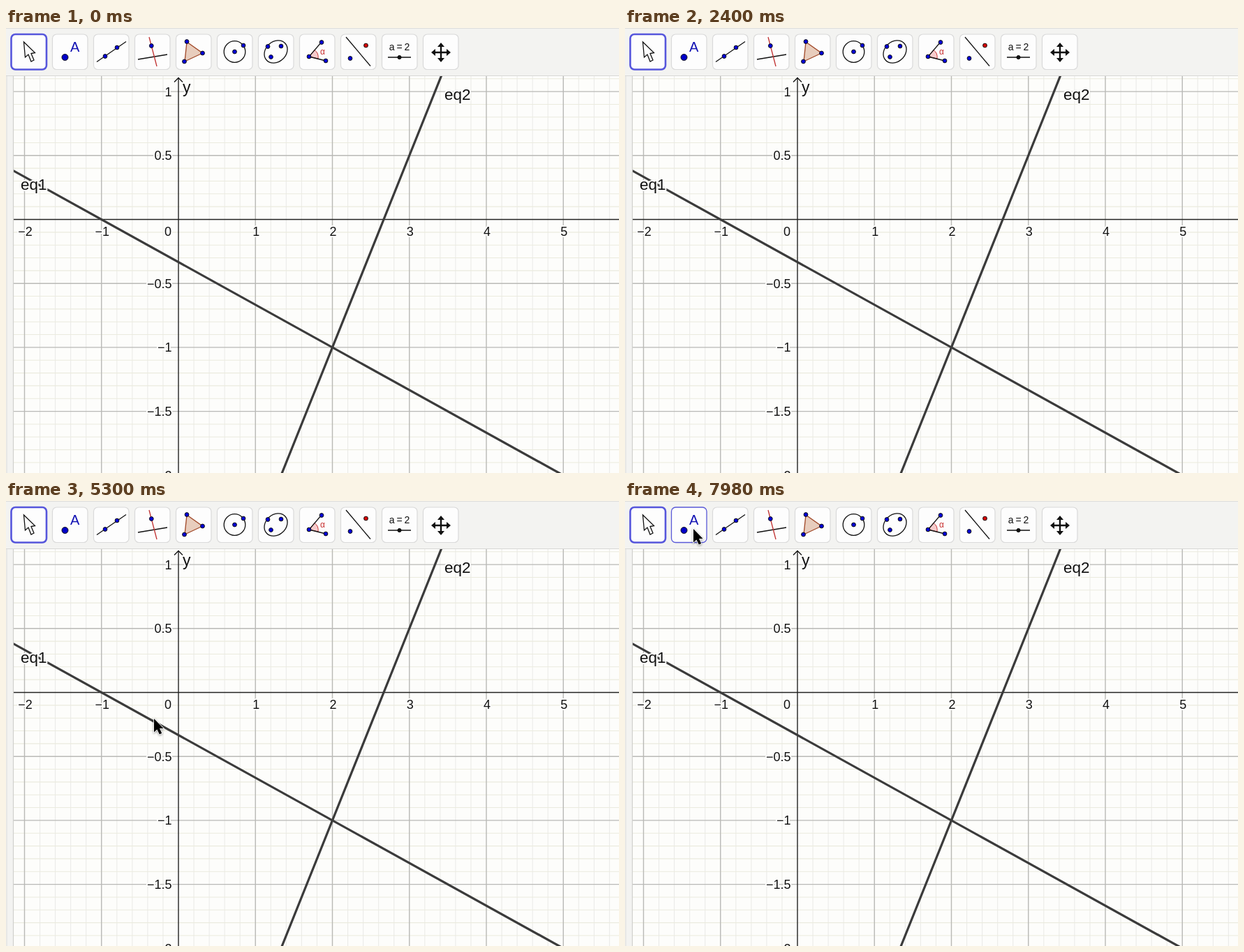
These frames come from a looping animation (878 px wide and 638 px high, 8 s). An HTML page:

```html
<!DOCTYPE html>
<html lang="en">
<head>
<meta charset="utf-8">
<title>Two lines</title>
<style>
  html, body { margin: 0; width: 100%; height: 100%; overflow: hidden; background: #f3f3f1; }
  svg { display: block; width: 878px; height: 638px; }
  text { font-family: "Liberation Sans", Arial, sans-serif; }
  .button { fill: #fdfdfd; stroke: #dadada; stroke-width: 1.2; }
  .button.hover { stroke: #5a5ad8; stroke-width: 1.3; }
  .button.selected { stroke: #5656dc; stroke-width: 2.6; }
  .icon { fill: none; stroke: #111; stroke-width: 1.3; }
  .halo { paint-order: stroke; stroke: #fdfdfb; stroke-width: 4; stroke-linejoin: round; fill: #111; }
</style>
</head>
<body>
<svg id="stage" viewBox="0 0 878 638"></svg>
<script>
const LOOP = 8000;
const ORIGIN = { x: 247, y: 274.5 };
const UNIT = { x: 110.25, y: 183.4 };
const px = x => ORIGIN.x + x * UNIT.x;
const py = y => ORIGIN.y - y * UNIT.y;

const line = (x1, y1, x2, y2, color, width) =>
  `<path d="M${x1} ${y1}L${x2} ${y2}" stroke="${color}" stroke-width="${width}" fill="none"/>`;
const label = (text, x, y, size = 18, anchor = 'start') =>
  `<text class="halo" x="${x}" y="${y}" font-size="${size}" text-anchor="${anchor}">${text}</text>`;
const dot = (x, y, color = '#0000d8', r = 2.9) =>
  `<circle cx="${x}" cy="${y}" r="${r}" fill="${color}" stroke="#111" stroke-width="1"/>`;
const stroke = (d, extra = '') => `<path class="icon" d="${d}" ${extra}/>`;
const signed = n => String(n).replace('-', '−');

function grid() {
  let minor = '', major = '';
  for (let i = -10; i <= 28; i++) {
    const x = px(i / 5);
    if (i % 5) minor += line(x, 69, x, 638, '#ebebe8', 1.1);
    else if (i) major += line(x, 69, x, 638, '#b9b9b6', 1.4);
  }
  for (let i = -19; i <= 11; i++) {
    const y = py(i / 10);
    if (i % 5) minor += line(10, y, 878, y, '#ebebde', 1.1);
    else if (i) major += line(10, y, 878, y, '#b9b9b6', 1.4);
  }
  return minor + major;
}

function axes() {
  let out = line(10, ORIGIN.y, 878, ORIGIN.y, '#222', 1.4)
    + line(ORIGIN.x, 71, ORIGIN.x, 638, '#222', 1.4)
    + stroke('M241 77.5L247 71.5L253 77.5');
  for (let x = -2; x <= 5; x++)
    if (x) out += label(signed(x), px(x) + 1, 297.5, 18, 'middle');
  out += label('0', 232, 297.5, 18, 'middle');
  for (let y = -2; y <= 1; y += 0.5)
    if (y) out += label(signed(y), 237.5, py(y) + 6.5, 18, 'end');
  return out + label('y', 253, 93, 23);
}

function graphs() {
  const curve = (f, x1, x2) => line(px(x1), py(f(x1)), px(x2), py(f(x2)), '#3b3b3b', 3.2);
  return curve(x => -(x + 1) / 3, -2.2, 5.2)
    + curve(x => 1.5 * x - 4, 1.2, 3.6)
    + label('eq1', 21, 232, 22.5)
    + label('eq2', 628, 103, 22.5);
}

const arrowHead = angle =>
  `<path d="M0 -14L5 -8H1.2V0H-1.2V-8H-5Z" fill="#111" transform="translate(623 35) rotate(${angle})"/>`;

const icons = [
  stroke('M25.5 20L27.5 42L32 38L36 48L40 46L36 36.5L41.5 35.5Z'),
  dot(84.5, 42, '#0000c8', 4.5)
    + '<text x="92" y="34" font-size="20" fill="#1414b4">A</text>',
  stroke('M130 48.5L172 19.5') + dot(142, 40.5) + dot(159, 28),
  stroke('M189 45L231 38') + stroke('M205 13L216 55', 'style="stroke:#c03030"') + dot(208.3, 25.5),
  stroke('M259 20L281.5 36L256 48Z', 'style="fill:#e8cdbd;stroke:#a04828"')
    + dot(259, 19.5) + dot(281.5, 36) + dot(255.5, 48),
  '<circle class="icon" cx="327.5" cy="34" r="15.3"/>' + dot(327.5, 34) + dot(340, 25),
  '<ellipse class="icon" cx="386.5" cy="34" rx="18" ry="14.5" transform="rotate(-42 386.5 34)"/>'
    + dot(375, 26.5) + dot(394, 26) + dot(379.5, 41.5),
  stroke('M434 41L442 31.5A13 13 0 0 1 447 44Z', 'style="fill:#f6cccc;stroke:#cc3a3a;stroke-width:1"')
    + stroke('M452 20L434 41L458 47') + dot(452, 20.5) + dot(434, 41) + dot(458, 47)
    + '<text x="450" y="38" font-size="12" fill="#c83030">α</text>',
  stroke('M487 13L522 54.5') + dot(493, 43.5) + dot(515.5, 25, '#d80000'),
  '<text x="563.5" y="32" font-size="14" text-anchor="middle" word-spacing="-1" fill="#111">a = 2</text>'
    + stroke('M547 42H580') + dot(563.5, 42, '#111', 2.6),
  [0, 90, 180, 270].map(arrowHead).join('')
];

const toolbar = icons.map((icon, i) =>
  `<rect class="button${i ? '' : ' selected'}" x="${7.5 + 59 * i}" y="9" width="50.5" height="50.5" rx="6"/>${icon}`
).join('');

document.getElementById('stage').innerHTML = `
  <defs><clipPath id="plot"><rect x="10" y="69" width="868" height="569"/></clipPath></defs>
  <rect width="878" height="638" fill="#f3f3f1"/>
  ${line(0, 0.5, 878, 0.5, '#dededc', 1)}
  <rect x="10" y="69" width="868" height="569" fill="#fdfdfb"/>
  <g clip-path="url(#plot)">${grid()}${axes()}${graphs()}</g>
  ${line(0, 68.5, 878, 68.5, '#d8d8d6', 1.2)}
  ${line(1, 69, 1, 638, '#dcdcda', 1)}
  ${line(10.5, 69, 10.5, 638, '#d0d0ce', 1.2)}
  ${toolbar}
  <path id="cursor" d="M0 0V19.5L4.4 15.4L7.8 22.6L11.2 21L8 14H13.6Z" fill="#000" stroke="#fff"
    stroke-width="1.6" style="paint-order:stroke;filter:drop-shadow(0 1.5px 1.5px #0006)"/>`;

const cursor = document.getElementById('cursor');
const pointButton = document.querySelectorAll('.button')[1];

// Pointer tip positions over time; hidden before the first one
const path = [
  { t: 4700, x: 330, y: 640 },
  { t: 5300, x: 212, y: 312 },
  { t: 6460, x: 125, y: 138 },
  { t: 7980, x: 98, y: 40 }
];
const smooth = u => u * u * (3 - 2 * u);

function pointerAt(t) {
  if (t < path[0].t) return null;
  const next = path.findIndex(p => p.t > t);
  if (next < 0) return path[path.length - 1];
  const a = path[next - 1], b = path[next];
  const u = smooth((t - a.t) / (b.t - a.t));
  return { x: a.x + (b.x - a.x) * u, y: a.y + (b.y - a.y) * u };
}

const start = performance.now();
function draw() {
  const tip = pointerAt((performance.now() - start) % LOOP);
  cursor.style.display = tip ? '' : 'none';
  if (tip) cursor.setAttribute('transform', `translate(${tip.x} ${tip.y})`);
  pointButton.classList.toggle('hover', !!tip && tip.x > 66 && tip.x < 118 && tip.y < 60);
  requestAnimationFrame(draw);
}
draw();
</script>
</body>
</html>
```
